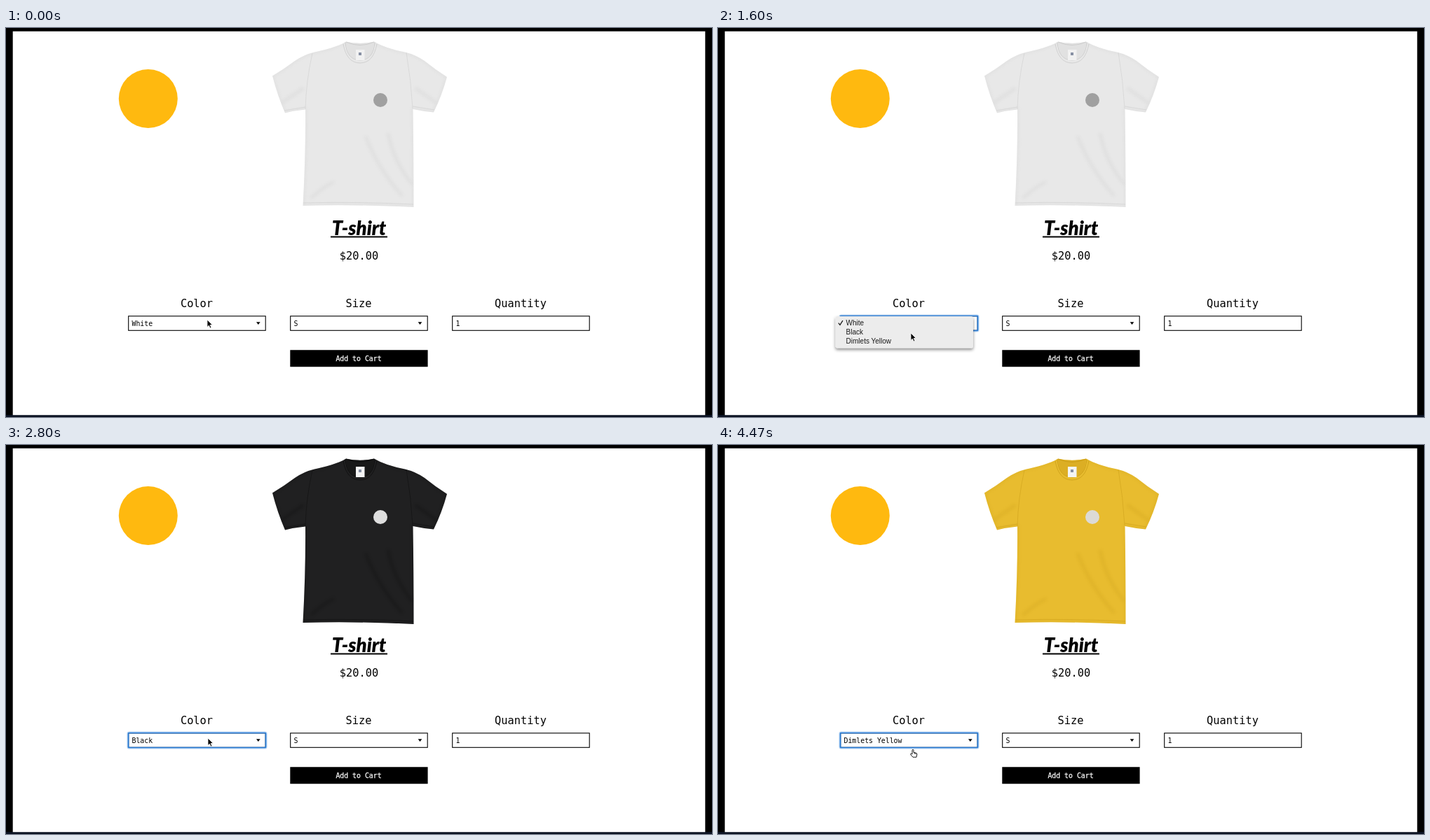
An HTML page that plays this animation: 1007x556 px, repeating every 4.6 s.

```html
<!DOCTYPE html>
<html lang="en">
<head>
<meta charset="utf-8">
<title>T-shirt</title>
<style>
  html, body { margin: 0; width: 100%; height: 100%; overflow: hidden; background: #000; }
  svg { display: block; }
  .mono { font-family: "DejaVu Sans Mono", "Noto Sans Mono", monospace; font-size: 9.85px; }
  .label { font-size: 15.35px; text-anchor: middle; }
  .title { font: italic 900 27.5px Lato, sans-serif; text-anchor: middle; }
  .menu text { font: 10px "Liberation Sans", Arial, sans-serif; }
</style>
</head>
<body>
<svg id="stage" width="1007" height="556" viewBox="0 0 1007 556"></svg>
<script>
const STEP = 4600 / 69, ROW = 13.3;
const names = ["White", "Black", "Dimlets Yellow"];
const shirts = [
  { cloth: "#e8e8e8", fold: "#bdbdbd", neck: "#e1e1e1", badge: "#a0a0a0", tag: "#f1f1f1" },
  { cloth: "#202021", fold: "#060606", neck: "#181818", badge: "#dedede", tag: "#f4f4f4" },
  { cloth: "#e8bc2f", fold: "#bd9110", neck: "#dcae24", badge: "#dcdad6", tag: "#f4f4f4" }
];
// Pointer keys: step, x, y
const path = [[0, 287, 417], [15, 287, 417], [16, 282, 425], [18, 275, 436],
  [36, 275, 436], [42, 288, 419], [47, 288, 419], [51, 276, 434], [69, 276, 435]];

const outline = `M485 19.5C473 27 455 31 440 34.5Q425 38 412 47Q396 59 380 68.5Q387 96 398 121.5
  Q412 118 427 116.5Q427.5 180 423.5 254Q500 252 581.5 256Q581.5 180 580.5 116Q594 119 610 120.5
  Q622 96 629 70Q613 60 597 47Q584 38 569 34.5Q541 29 525 19.5Q505 24 485 19.5Z`;

const label = (x, y, s) => `<text class="mono label" x="${x}" y="${y}">${s}</text>`;
const field = (x, s, id = "") => `<rect x="${x + .7}" y="411.8" width="195.5" height="20.5" fill="#fff" stroke="#000" stroke-width="1.1"/>
  <text class="mono" x="${x + 5.5}" y="425.5" id="${id}">${s}</text>`;
const arrow = x => `<path d="M${x} 420.3h5.6l-2.8 3.6z"/>`;

const stage = document.getElementById("stage");
stage.innerHTML = `
  <defs>
    <filter id="soft" x="-50%" y="-50%" width="200%" height="200%"><feGaussianBlur stdDeviation="2"/></filter>
    <filter id="shade" x="-10%" y="-20%" width="120%" height="150%">
      <feDropShadow dx="0" dy="2.5" stdDeviation="2.3" flood-opacity=".45"/></filter>
    <linearGradient id="blue" x2="0" y2="1"><stop stop-color="#4e98fb"/><stop offset="1" stop-color="#3b83f7"/></linearGradient>
    <clipPath id="cut"><path d="${outline}"/></clipPath>
  </defs>
  <path fill="#0b1222" d="M0 553h1007v3H0z"/>
  <path fill="#fff" d="M9.7 4.7h987.6v548.5H9.7z"/>
  <circle cx="202.8" cy="101" r="42" fill="#ffb90f"/>
  <g id="shirt"></g>
  <text class="title" x="503.5" y="296">T-shirt</text>
  <path d="M463 297.5h81v2h-81z"/>
  ${label(503.5, 331, "$20.00")}
  ${label(272, 398.5, "Color")}${label(503, 398.5, "Size")}${label(734, 398.5, "Quantity")}
  ${field(174, "White", "choice")}${arrow(357)}
  ${field(405, "S")}${arrow(587.7)}
  ${field(636, "1")}
  <g id="focus" fill="none" stroke="#2f80d8">
    <rect x="174" y="411" width="197" height="22" rx="1.5" stroke-width="3" opacity=".35"/>
    <rect x="174.5" y="411.5" width="196" height="21" rx="1" stroke-width="1.7"/>
  </g>
  <path d="M405.3 460.2h196.3v24H405.3z"/>
  <text class="mono" x="503" y="475.7" fill="#fff" stroke="#fff" stroke-width=".25" text-anchor="middle">Add to Cart</text>
  <g id="menu" class="menu"></g>
  <g id="pointer">
    <path id="tip" d="M0 0V10.4L2.4 8.2L4.1 12L5.9 11.2L4.2 7.5H7.4Z" stroke="#fff" stroke-width=".8"/>
    <path id="hand" transform="translate(-2)" fill="#fff" stroke="#000" stroke-width=".9"
      d="M3 7V1.5a1 1 0 0 1 2 0V4.5l3.5.8q1.5.4 1.3 2L9 11.3H4L.8 7.6q-.6-1.5.8-1.3zM6.4 5v1.6M8 5.3V7"/>
  </g>`;
const el = id => document.getElementById(id);

function drawShirt(c) {
  return `<path d="${outline}" fill="${c.cloth}"/>
    <g clip-path="url(#cut)" fill="none" stroke="${c.fold}">
      <g filter="url(#soft)" stroke-width="4" opacity=".2">
        <path d="M513 155Q530 200 565 240M545 150Q552 190 580 224M435 243Q455 225 468 220M392 108L424 86M615 108L584 86"/>
        <path d="${outline}" stroke-width="3"/>
      </g>
      <path d="M437 36Q428 76 427 116M571 35Q578 76 580 115M424 250Q500 248 581 252M397 118L427 113M580 112L611 117"
        stroke-width=".7" opacity=".5"/>
    </g>
    <path d="M485 20Q505 24 525 20Q524 46 505 46Q486 46 485 20Z" fill="${c.neck}"/>
    <path d="M485 20Q505 29 525 20M484 20.5Q486 46 505 46Q524 46 526 20.5M481 23Q486 50 505 50Q524 50 529 23"
      fill="none" stroke="${c.fold}" stroke-width=".8" opacity=".7"/>
    <path d="M499 31h12.5v15H499z" fill="${c.tag}"/>
    <path d="M503 35h4v4h-4z" fill="#8790a4"/>
    <circle cx="534" cy="103" r="10" fill="${c.badge}"/>`;
}

function drawMenu(top, picked, hover) {
  const rows = names.map((name, i) => {
    const y = top + 2.6 + i * ROW, on = i === hover, ink = on ? "#fff" : "#1a1a1a";
    return (on ? `<rect x="167.5" y="${y}" width="196.5" height="${ROW}" fill="url(#blue)"/>` : "") +
      (i === picked ? `<path d="M171.8 ${y + 7}l2.2 2.7l4-6.2" fill="none" stroke="${ink}" stroke-width="1.3"/>` : "") +
      `<text x="182.6" y="${y + 10.2}" fill="${ink}">${name}</text>`;
  });
  return `<rect x="167.5" y="${top}" width="196.5" height="45.5" rx="3" fill="#ececec" filter="url(#shade)"/>` + rows.join("");
}

function pointerAt(k) {
  const i = path.findIndex(p => p[0] > k), [k0, x0, y0] = path[i - 1], [k1, x1, y1] = path[i];
  const u = (k - k0) / (k1 - k0);
  return [x0 + (x1 - x0) * u, y0 + (y1 - y0) * u];
}

let last = -1;
function render(k) {
  const round = k < 37 ? 0 : 1;
  const opens = [8, 43][round], click = [24, 59][round], since = k - click;
  const alpha = k < opens ? 0 : since < 2 ? 1 : [.85, .5, .17][since - 2] || 0;
  const [x, y] = pointerAt(k);
  const top = 412 - round * ROW;
  const hover = since === 0 ? -1 : Math.floor((y - top - 2.6) / ROW);
  const hand = !alpha && y > 433 && (round === 0 || since > 0);

  el("shirt").innerHTML = drawShirt(shirts[k < 32 ? 0 : k < 67 ? 1 : 2]);
  el("choice").textContent = names[k < 32 ? 0 : k < 66 ? 1 : 2];
  el("focus").style.display = k < 9 ? "none" : "";
  el("menu").innerHTML = alpha ? drawMenu(top, round, hover) : "";
  el("menu").setAttribute("opacity", alpha);
  el("pointer").setAttribute("transform", `translate(${x} ${y})`);
  el("tip").style.display = hand ? "none" : "";
  el("hand").style.display = hand ? "" : "none";
}

const start = performance.now();
function tick() {
  const t = (performance.now() - start) % 4600;
  const k = Math.floor((t + 5) / STEP) % 69;
  if (k !== last) render(last = k);
  requestAnimationFrame(tick);
}
tick();
</script>
</body>
</html>
```
